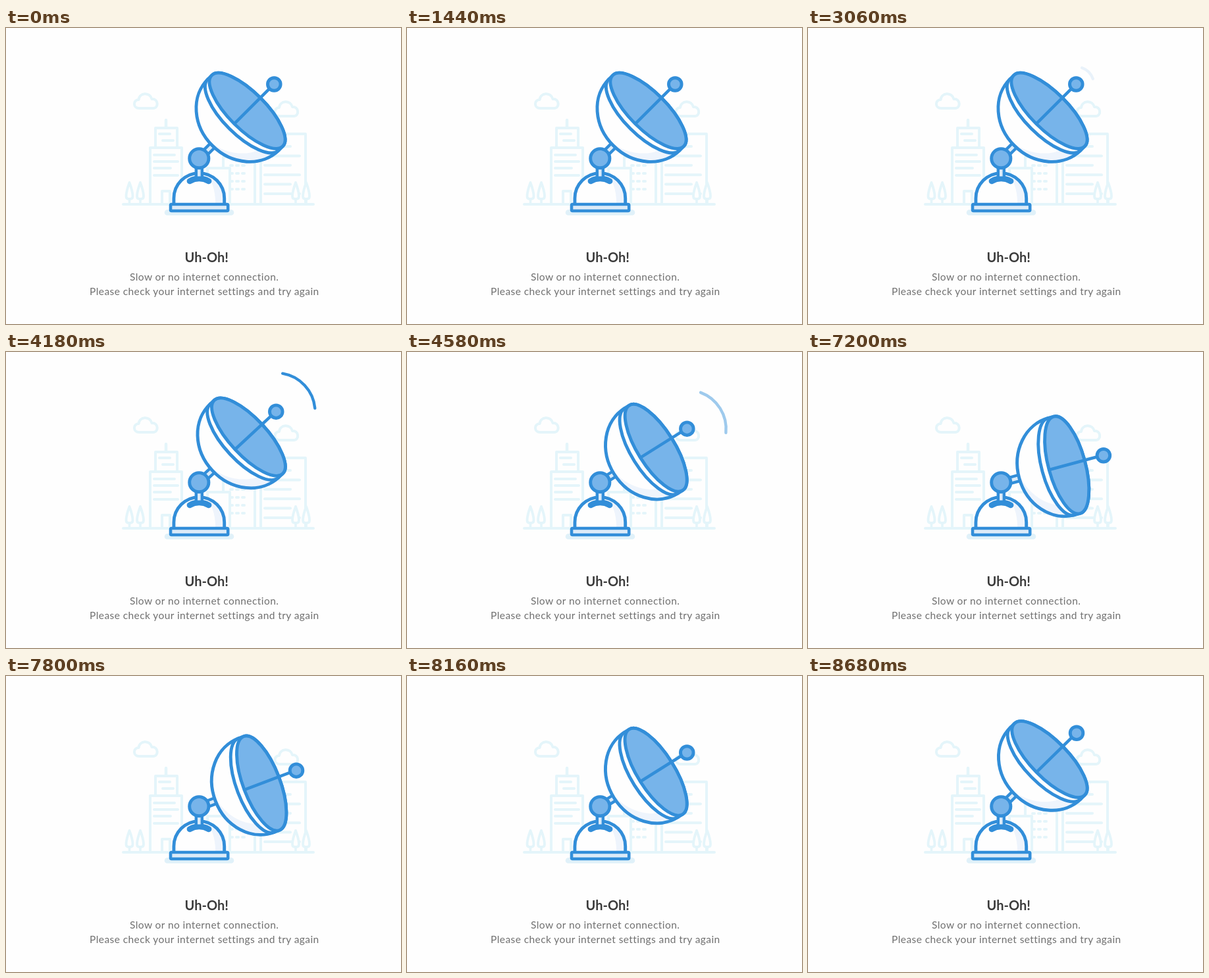
These frames come from a looping animation (600 by 450 pixels, 8700 ms). An HTML page with a canvas:

```html
<!DOCTYPE html>
<html lang="en">
<head>
<meta charset="utf-8">
<title>No connection</title>
<style>
  html, body { margin: 0; width: 100%; height: 100%; overflow: hidden; background: #fefefe; }
  canvas, svg { position: absolute; left: 0; top: 0; display: block; }
  text { font-family: Lato, "Open Sans", sans-serif; }
  .title { font-size: 20px; font-weight: 700; fill: #3b3b3b; }
  .body { font-size: 15.5px; letter-spacing: .425px; fill: #707070; }
</style>
</head>
<body>
<canvas id="stage" width="600" height="450"></canvas>
<svg width="600" height="450">
  <text class="title" x="271.5" y="355.5">Uh-Oh!</text>
  <text class="body" x="188" y="384">Slow or no internet connection.</text>
  <text class="body" x="127" y="406">Please check your internet settings and try again</text>
</svg>
<script>
const ctx = document.getElementById('stage').getContext('2d');
const LOOP = 8700;
const BLUE = '#328ed9', SKY = '#77b4ea', PALE = '#dcebf8', SHADE = '#eef4fc', WHITE = '#fefefe', CITY = '#e4f5fa';
const JOINT = { x: 293.3, y: 199 };
const RAD = Math.PI / 180;
const ANGLE_UP = -45 * RAD, ANGLE_DOWN = -15.2 * RAD;
const RIM = 76.3;
const WAVES = [
  { start: 340, out: 1220 },
  { start: 1700, out: 2570 },
  { start: 3040, out: 4470 }
];
const ARCS = [
  { r: 27, half: 26 * RAD },
  { r: 43, half: 33 * RAD },
  { r: 59.3, half: 37.5 * RAD }
];
const STEP = 280, FADE = 210;

const clamp = v => Math.max(0, Math.min(1, v));
const mix = (a, b, k) => a + (b - a) * k;
const ease = v => (1 - Math.cos(Math.PI * clamp(v))) / 2;

function shape(build, fill, stroke, width = 4.9) {
  ctx.beginPath();
  build(ctx);
  if (fill) { ctx.fillStyle = fill; ctx.fill(); }
  if (stroke) { ctx.strokeStyle = stroke; ctx.lineWidth = width; ctx.stroke(); }
}

function lines(list, color, width) {
  shape(c => list.forEach(([x1, y1, x2, y2]) => { c.moveTo(x1, y1); c.lineTo(x2, y2); }), null, color, width);
}

const box = (x1, y1, x2, y2) => shape(c => c.rect(x1, y1, x2 - x1, y2 - y1), WHITE, CITY, 4);
const disc = (x, y, r) => shape(c => c.arc(x, y, r, 0, 7), SKY, BLUE);

function cloud(x, y) {
  shape(c => {
    c.moveTo(x + 9, y + 22);
    c.bezierCurveTo(x - 1, y + 22, x - 1, y + 9, x + 8, y + 9);
    c.bezierCurveTo(x + 9, y - 2, x + 25, y - 3, x + 28, y + 8);
    c.bezierCurveTo(x + 38, y + 7, x + 39, y + 22, x + 30, y + 22);
    c.closePath();
  }, WHITE, CITY, 4);
}

function tree(x) {
  lines([[x, 260, x, 268]], CITY, 3.6);
  shape(c => {
    c.moveTo(x, 235);
    c.bezierCurveTo(x + 3, 243, x + 5, 250, x + 5, 256);
    c.quadraticCurveTo(x + 5, 260, x, 260);
    c.quadraticCurveTo(x - 5, 260, x - 5, 256);
    c.bezierCurveTo(x - 5, 250, x - 3, 243, x, 235);
  }, WHITE, CITY, 3.8);
}

function city() {
  cloud(193.5, 100);
  cloud(407, 112);

  lines([[243, 140, 243, 151]], CITY, 4.4);
  box(227, 152, 260, 182);
  lines([[233, 161, 249, 161], [238, 171, 254, 171]], CITY, 4);
  box(219, 182, 267, 268);
  lines([[225, 193, 256, 193], [225, 203, 261, 203], [225, 213, 250, 213], [225, 224, 261, 224]], CITY, 4);
  box(237, 248, 249, 268);

  box(330, 196, 378, 268);
  for (let y = 209; y <= 247; y += 12)
    lines([[341, y, 344, y], [350, y, 353, y], [359, y, 362, y]], CITY, 4);
  box(306, 213, 340, 268);

  box(387, 161, 455, 268);
  for (let i = 0; i < 6; i++) {
    const y = 180 + i * 14.4;
    lines([[393, y, i % 2 ? 446 : 432, y]], CITY, 4);
  }

  [187.5, 204, 440, 456].forEach(tree);
  lines([[178, 268, 467, 268]], CITY, 4);
}

function base() {
  lines([[245, 280.5, 342, 280.5]], '#e0f1f9', 8.5);

  const dome = c => {
    c.moveTo(254.9, 269);
    c.lineTo(254.9, 259);
    c.arc(293.3, 259, 38.4, Math.PI, 0);
    c.lineTo(331.7, 269);
  };
  shape(dome, WHITE);
  ctx.save();
  ctx.beginPath();
  dome(ctx);
  ctx.clip();
  shape(c => {
    c.moveTo(301, 219);
    c.quadraticCurveTo(319, 236, 318, 270);
    c.lineTo(336, 270);
    c.lineTo(336, 219);
  }, SHADE);
  ctx.restore();
  shape(dome, null, BLUE);
  shape(c => c.roundRect(250, 268, 87.2, 10, 1.5), PALE, BLUE, 4.6);

  shape(c => {
    c.moveTo(279, 232.8);
    c.quadraticCurveTo(293.3, 224.8, 308, 232.8);
  }, null, BLUE, 8.8);
  shape(c => c.rect(288.8, 205, 9, 22.8), PALE, BLUE, 4.4);
}

const bowl = c => c.ellipse(95, 0, 66.5, RIM, 0, Math.PI / 2, Math.PI * 1.5);

function dish(angle, center) {
  ctx.save();
  ctx.translate(center.x, center.y);
  ctx.rotate(angle);
  ctx.translate(-100, 0);

  shape(c => c.rect(4, -4.6, 28, 9.2), PALE, BLUE, 4.4);

  shape(bowl, SHADE);
  ctx.save();
  ctx.beginPath();
  bowl(ctx);
  ctx.clip();
  shape(c => c.ellipse(98, -18, 69, 78, 0, 0, 7), WHITE);
  ctx.restore();
  shape(bowl, null, BLUE);

  shape(c => {
    c.ellipse(95, 0, 30, RIM, 0, Math.PI / 2, Math.PI * 1.5);
    c.ellipse(103.5, 0, 28, RIM, 0, -Math.PI / 2, Math.PI / 2);
    c.closePath();
  }, WHITE, BLUE);
  shape(c => c.ellipse(103.5, 0, 28, RIM, 0, 0, 7), SKY, BLUE);
  ctx.restore();
}

// Each arc fades in while the one inside it fades out.
function waves(t, ball, angle) {
  for (const { start, out } of WAVES) {
    ARCS.forEach(({ r, half }, i) => {
      const on = start + i * STEP;
      const off = i < 2 ? on + STEP : out;
      const alpha = Math.min(clamp((t - on) / FADE), 1 - clamp((t - off) / FADE));
      if (alpha <= 0) return;
      ctx.globalAlpha = alpha;
      shape(c => c.arc(ball.x, ball.y, r, angle - half, angle + half), null, BLUE, 4.4);
      ctx.globalAlpha = 1;
    });
  }
}

function tilt(t) {
  return t < 6000 ? ease((t - 3940) / 1400) : 1 - ease((t - 7400) / 1400);
}

// Parts of the dish slide along the chord between the two poses.
function along(r, k) {
  return {
    x: JOINT.x + r * mix(Math.cos(ANGLE_UP), Math.cos(ANGLE_DOWN), k),
    y: JOINT.y + r * mix(Math.sin(ANGLE_UP), Math.sin(ANGLE_DOWN), k)
  };
}

function draw(t) {
  const k = tilt(t);
  const angle = mix(ANGLE_UP, ANGLE_DOWN, k);
  const center = along(100, k);
  const ball = along(161.2, k);

  ctx.fillStyle = WHITE;
  ctx.fillRect(0, 0, 600, 450);
  ctx.lineCap = ctx.lineJoin = 'round';

  city();
  base();
  dish(angle, center);
  const root = { x: center.x - 24 * Math.cos(angle), y: center.y - 24 * Math.sin(angle) };
  lines([[root.x, root.y, ball.x, ball.y]], BLUE, 4.6);
  disc(JOINT.x, JOINT.y - 0.8, 14.6);
  disc(ball.x, ball.y + 0.5, 9.8);
  waves(t, { x: ball.x, y: ball.y + 1 }, angle);
}

const began = performance.now();
function tick() {
  draw((performance.now() - began) % LOOP);
  requestAnimationFrame(tick);
}
tick();
</script>
</body>
</html>
```
